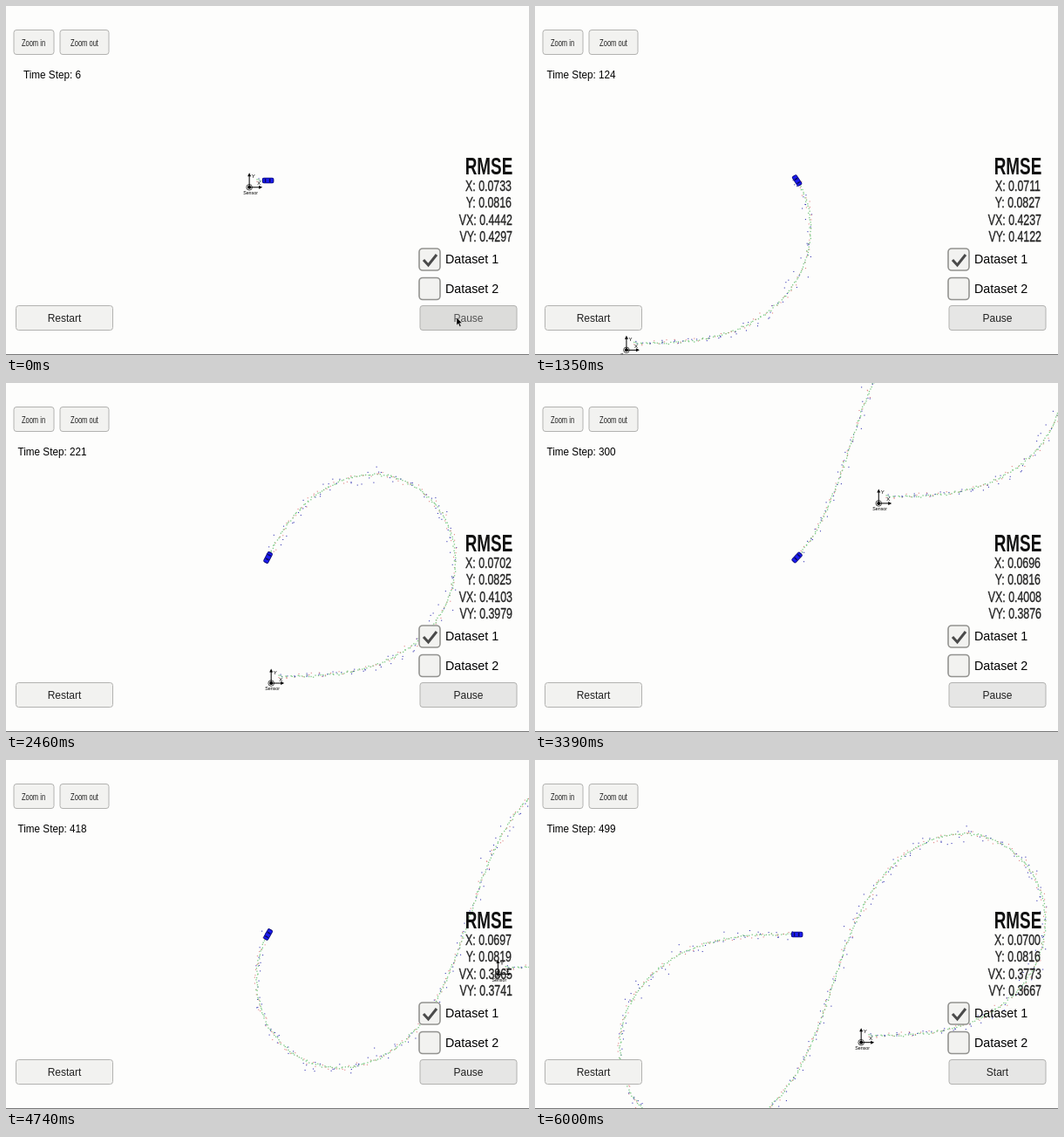
Write an HTML page with a canvas that moves like this. It is 600x400 px and loops after 6.03 s.

```html
<!DOCTYPE html>
<html>
<head>
<meta charset="utf-8">
<style>
html, body { margin: 0; width: 100%; height: 100%; overflow: hidden; background: #fdfdfc; }
canvas, svg { position: absolute; left: 0; top: 0; }
svg { font: 12px "Liberation Sans", Arial, sans-serif; fill: #222; }
.button { fill: #f2f2f0; stroke: #b2b2b0; }
.box { fill: #f2f2f0; stroke: #92928f; stroke-width: 1.6; }
#toggle { fill: #e6e6e5; }
#toggle.down { fill: #dcdcda; }
.mid { text-anchor: middle; }
.end { text-anchor: end; font-size: 16.5px; stroke: #222; stroke-width: .35; }
.data { font-size: 14.3px; fill: #000; }
</style>
</head>
<body>
<canvas id="view" width="600" height="400"></canvas>
<svg width="600" height="400">
  <rect class="button" x="9" y="27.5" width="46" height="28" rx="3"/>
  <rect class="button" x="62" y="27.5" width="56" height="28" rx="3"/>
  <g class="mid" font-size="10.5">
    <text transform="translate(31.5 45.5) scale(.72 1)">Zoom in</text>
    <text transform="translate(90 45.5) scale(.72 1)">Zoom out</text>
  </g>
  <text id="step" class="mid" transform="translate(53 83) scale(.93 1)" font-size="12.6" fill="#000"></text>

  <text class="mid" transform="translate(554 193) scale(.7 1)" font-size="27" font-weight="bold" fill="#111">RMSE</text>
  <g class="end">
    <text class="error" transform="translate(580 212) scale(.75 1)"></text>
    <text class="error" transform="translate(580 231) scale(.75 1)"></text>
    <text class="error" transform="translate(581 251) scale(.75 1)"></text>
    <text class="error" transform="translate(581 269.5) scale(.75 1)"></text>
  </g>

  <rect class="box" x="474" y="278" width="24" height="25" rx="4"/>
  <rect class="box" x="474" y="311.5" width="24" height="25" rx="4"/>
  <path d="M479 291l5.5 6 9.5-12" fill="none" stroke="#4a4a4a" stroke-width="3"/>
  <text class="data" x="504" y="295">Dataset 1</text>
  <text class="data" x="504" y="329">Dataset 2</text>

  <rect class="button" x="11.5" y="343.5" width="111" height="28" rx="3"/>
  <text class="mid" x="67" y="362">Restart</text>
  <rect id="toggle" class="button" x="475" y="343.5" width="111" height="28" rx="3"/>
  <text id="label" class="mid" x="530.5" y="362">Pause</text>
  <path id="pointer" d="M517 357v9l2-2 1.5 3.5 1.5-.7-1.5-3.3h2.7z" fill="#000" stroke="#fff" stroke-width=".4"/>
  <rect y="399" width="600" height="1" fill="#777"/>
</svg>
<script>
const $ = id => document.getElementById(id);
const ctx = $("view").getContext("2d");
const errorTexts = document.querySelectorAll(".error");
const LOOP = 6030, TICK = 30, LAST = 499, DT = 0.05;
const SX = 10.4, SY = 11.25;        // pixels per metre
const CAR = { x: 300.6, y: 200 };

const times = [0, 1350, 2460, 3390, 4050, 4740, 5670];
const steps = [6, 124, 221, 300, 356, 418, LAST];
const errors = {
  X: [.0733, .0711, .0702, .0696, .0704, .0697, .0700],
  Y: [.0816, .0827, .0825, .0816, .0831, .0819, .0816],
  VX: [.4442, .4237, .4103, .4008, .3939, .3865, .3773],
  VY: [.4297, .4122, .3979, .3876, .3812, .3741, .3667]
};

function interpolate(xs, ys, x) {
  let i = 0;
  while (i < xs.length - 2 && x > xs[i + 1]) i++;
  const u = Math.min(1, (x - xs[i]) / (xs[i + 1] - xs[i]));
  return ys[i] + (ys[i + 1] - ys[i]) * u;
}

let seed = 7;
const random = () => (seed = seed * 16807 % 2147483647) / 2147483647;
const gauss = () => 2 * (random() + random() + random() - 1.5);

// The yaw rate follows one sine period over 25 seconds.
const yaw = t => 0.55 * 25 / (2 * Math.PI) * (1 - Math.cos(2 * Math.PI * t / 25));
const speed = t => 5 + 0.2 * Math.cos(4 * Math.PI * t / 25);

const track = [];
for (let i = 0, x = 0.6, y = 0.6; i <= LAST; i++) {
  const radius = Math.hypot(x, y), angle = Math.atan2(y, x);
  const r = radius + 0.3 * gauss(), a = angle + 0.03 * gauss();
  track.push({
    x, y, yaw: yaw(i * DT),
    guess: [x + 0.06 * gauss(), y + 0.06 * gauss()],
    reading: i % 2 ? [r * Math.cos(a), r * Math.sin(a)]
                   : [x + 0.15 * gauss(), y + 0.15 * gauss()]
  });
  const mid = (i + 0.5) * DT;
  x += speed(mid) * Math.cos(yaw(mid)) * DT;
  y += speed(mid) * Math.sin(yaw(mid)) * DT;
}

function dot(x, y, size, color) {
  ctx.fillStyle = color;
  ctx.fillRect(x - size / 2, y - size / 2, size, size);
}

function drawSensor(x, y) {
  ctx.save();
  ctx.translate(x, y);
  ctx.strokeStyle = ctx.fillStyle = "#000";
  ctx.lineWidth = 1;
  ctx.beginPath();
  ctx.moveTo(0, -14);
  ctx.lineTo(0, 0);
  ctx.lineTo(12, 0);
  ctx.stroke();
  ctx.beginPath();
  ctx.moveTo(-2, -12.5); ctx.lineTo(0, -16.5); ctx.lineTo(2, -12.5);
  ctx.moveTo(11, -2); ctx.lineTo(15, 0); ctx.lineTo(11, 2);
  ctx.fill();
  ctx.lineWidth = 0.7;
  ctx.beginPath();
  ctx.arc(0, 0, 3.3, 0, 7);
  ctx.stroke();
  ctx.beginPath();
  ctx.arc(0, 0, 2, 0, 7);
  ctx.fill();
  ctx.font = '6px "Liberation Sans", sans-serif';
  ctx.fillText("Y", 2.5, -10.5);
  ctx.fillText("X", 9, -2.5);
  ctx.font = '5.3px "Liberation Sans", sans-serif';
  ctx.fillText("Sensor", -7, 8);
  ctx.restore();
}

function drawCar(angle) {
  ctx.save();
  ctx.translate(CAR.x, CAR.y);
  ctx.rotate(-angle);
  ctx.fillStyle = "#0a0a70";
  ctx.beginPath();
  ctx.roundRect(-6.8, -3.3, 13.6, 6.6, 2);
  ctx.fill();
  ctx.fillStyle = "#1c1cf0";
  ctx.fillRect(-5.8, -2.5, 11.6, 5);
  ctx.fillStyle = "#0a0a60";
  ctx.fillRect(-3.8, -2, 1.5, 4);
  ctx.fillRect(1.2, -2, 1.7, 4);
  ctx.restore();
}

function draw(now) {
  const time = Math.floor(now % LOOP / TICK) * TICK;
  const step = Math.round(interpolate(times, steps, time));
  const car = track[step];
  const ox = CAR.x - car.x * SX, oy = CAR.y + car.y * SY;

  ctx.clearRect(0, 0, 600, 400);
  for (let i = 1; i <= step; i++) {
    const { guess, reading } = track[i];
    dot(ox + reading[0] * SX, oy - reading[1] * SY, 1.1, i % 2 ? "#3c3cb4" : "#e08080");
    dot(ox + guess[0] * SX, oy - guess[1] * SY, 1.3, "#7cca84");
  }
  drawSensor(ox + 1, oy + 1);
  drawCar(car.yaw);

  $("step").textContent = "Time Step: " + step;
  Object.keys(errors).forEach((key, i) => {
    errorTexts[i].textContent = key + ": " + interpolate(steps, errors[key], step).toFixed(4);
  });
  const pressed = time < 150;
  $("toggle").classList.toggle("down", pressed);
  $("pointer").style.display = pressed ? "" : "none";
  $("label").style.fill = pressed ? "#555" : "";
  $("label").textContent = step < LAST ? "Pause" : "Start";
}

const start = performance.now();
function frame() {
  draw(performance.now() - start);
  requestAnimationFrame(frame);
}
frame();
</script>
</body>
</html>
```
